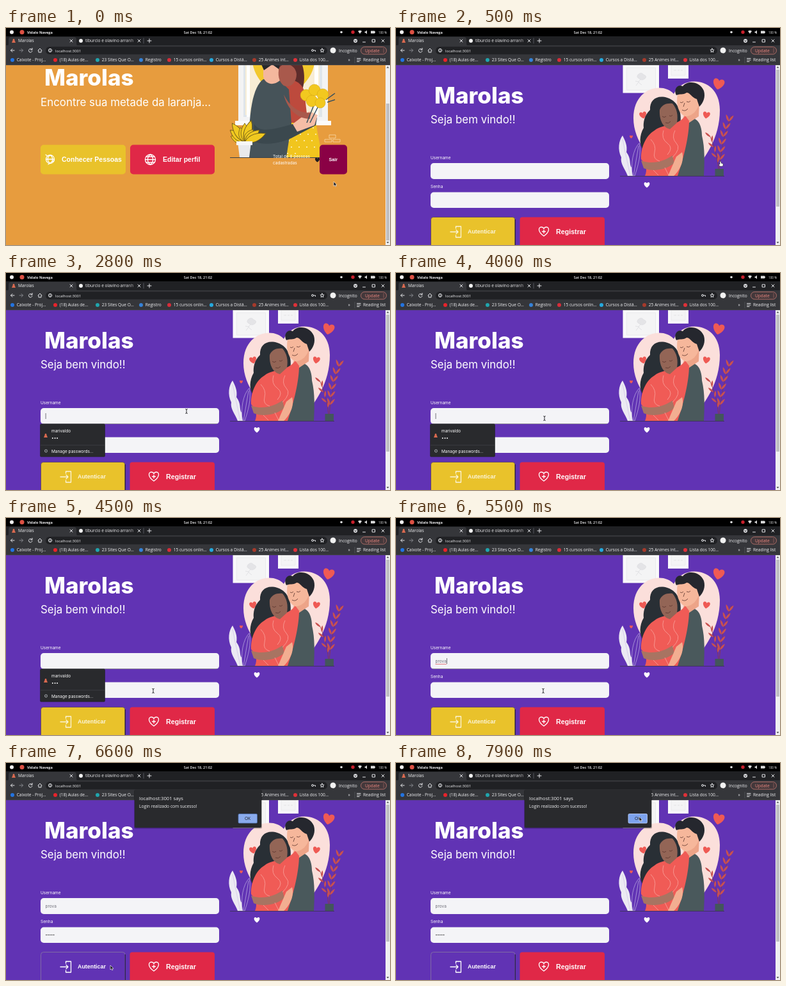
Recreate the animation shown at these times as an HTML page. Size 600 by 339 pixels, loop 8 s.

```html
<!DOCTYPE html>
<html lang="pt">
<head>
<meta charset="utf-8">
<title>Marolas</title>
<style>
html,body{margin:0;width:100%;height:100%;overflow:hidden;background:#6133b4}
svg{display:block;width:100%;height:100%}
text{font:6.6px "Open Sans","Noto Sans",sans-serif;fill:#f1f1f3;white-space:pre}
.page text{font-family:Inter,"Open Sans",sans-serif;font-size:6.5px;fill:#fff}
.page .logo{font-size:35px;font-weight:800}
.page .lead{font-size:16.9px}
.page .btn{font:bold 10.5px "Liberation Sans",Arial,sans-serif}
.page .typed{fill:#70707a}
.line{fill:none;stroke:#fff;stroke-width:1.3;stroke-linecap:round;stroke-linejoin:round}
.ui{fill:none;stroke:#e4e5e8;stroke-width:1;stroke-linecap:round}
</style>
</head>
<body>
<svg viewBox="0 0 600 339">
<defs>
  <path id="heart" d="M0 5.500C-7 1-6.500-5-3-5Q-.8-5 0-3Q.8-5 3-5C6.500-5 7 1 0 5.500Z"/>
  <path id="leaf" d="M0 0C-4-4-3-9 0-13C3-9 4-4 0 0Z"/>
  <path id="person" d="M-1-3h2l.6 2.500L3 3h-6l1.400-3.500Z" fill="#d9694f"/>
  <path id="cross" d="M-2-2L2 2M2-2L-2 2"/>
  <linearGradient id="fade"><stop stop-color="#202124" stop-opacity="0"/><stop offset="1" stop-color="#202124"/></linearGradient>
</defs>

<g id="home" class="page">
  <rect width="600" height="339" fill="#e79c3e"/>
  <text class="logo" x="60" y="90">Marolas</text>
  <text class="lead" x="54" y="122">Encontre sua metade da laranja...</text>
  <!-- window and couple -->
  <path d="M363 50H503V146H363Z" fill="#f3f3f4"/>
  <path d="M371 50H494V139H371Z" fill="#dfe5ea"/>
  <path d="M374 50H490V136H374Z" fill="#f8edd5"/>
  <path d="M385 50H482C482 82 450 100 434 116C416 100 386 82 385 50Z" fill="#f2c82c"/>
  <path d="M482 50H488V139H482ZM376 50H381V139H376Z" fill="#fff"/>
  <path d="M358 145H508V152H358Z" fill="#fbfbfb"/>
  <path d="M424 50H460C470 72 466 94 458 108L430 90Z" fill="#5d2c2b"/>
  <path d="M432 84C444 78 460 82 466 98L472 152H440Z" fill="#bd4a3d"/>
  <path d="M442 148H484L494 202H434Z" fill="#f1c51e"/>
  <g id="dots" fill="#fff6cf"></g>
  <path d="M402 80C386 92 378 130 380 202H438L446 150 442 96 428 82Z" fill="#465359"/>
  <path d="M388 150C396 165 420 158 448 150L486 140 484 152 446 172C420 184 394 182 386 176Z" fill="#3b484e"/>
  <path d="M448 150L474 130 487 136 482 152 455 162Z" fill="#f5bda6"/>
  <path d="M402 50H424L428 82C416 92 404 86 402 76Z" fill="#f4b79d"/>
  <path d="M427 62C434 52 452 56 454 72C454 86 444 94 434 90C426 84 424 72 427 62Z" fill="#a9594c"/>
  <path d="M396 50H430L426 64 416 57 403 66Z" fill="#25272c"/>
  <path d="M434 104C444 124 460 134 476 132L475 142C456 142 440 128 434 104Z" fill="#a9594c"/>
  <path d="M482 118L470 148M490 118L475 148M500 112L514 102M502 116L514 112" fill="none" stroke="#38505c" stroke-width="1.500"/>
  <g fill="#f2c81f" stroke="#d6a713" stroke-width=".6"><circle cx="469" cy="105" r="9"/><circle cx="482" cy="97" r="9"/><circle cx="495" cy="104" r="9"/><circle cx="478" cy="114" r="9"/><circle cx="491" cy="117" r="8"/></g>
  <g id="bush" fill="#f0c920" stroke="#6e5a18" stroke-width=".4"></g>
  <path d="M362 178H383L380 202H365Z" fill="#e9eaec"/><path d="M360 177H385V183H360Z" fill="#f7f7f8"/>
  <path d="M350 202.500H521" stroke="#37414a"/>
  <path d="M505 167h10v5h-10zM498 174h11v4h-11zM511 174h11v4h-11z" fill="none" stroke="#f8d9a9" stroke-width=".8"/>
  <rect x="54" y="182.500" width="133" height="46" rx="5" fill="#e9c22b"/>
  <rect x="194" y="182.500" width="132" height="46" rx="5" fill="#e02847"/>
  <rect x="490" y="182.500" width="43" height="46" rx="5" fill="#8a0145"/>
  <g class="line"><circle cx="69" cy="205" r="6.500"/><path d="M62.500 205H75.500M69 198.500C64 202 64 208 69 211.500C74 208 74 202 69 198.500M62 198l3 2M66 213l9-6"/>
  <circle cx="225.500" cy="205.500" r="8"/><path d="M217.500 205.500h16M219 201h13M219 210h13M225.500 197.500C220 202 220 209 225.500 213.500C231 209 231 202 225.500 197.500"/></g>
  <text class="btn" x="87" y="209">Conhecer Pessoas</text>
  <text class="btn" x="245" y="209">Editar perfil</text>
  <text class="btn" x="504.500" y="208" style="font-size:7.200px">Sair</text>
  <text x="417" y="203">Total de 8 pessoas</text><text x="417" y="212.500">cadastradas</text>
  <use href="#heart" transform="translate(486.500 206)scale(.65)" fill="#1e1a20"/>
</g>

<g id="login" class="page">
  <rect width="600" height="339" fill="#6133b4"/>
  <text class="logo" x="60" y="118">Marolas</text>
  <text class="lead" x="54" y="149.300">Seja bem vindo!!</text>
  <!-- pictures on the wall -->
  <path d="M354.500 58H411V101.500H354.500ZM425 50H457V79H425Z" fill="#f9f9fa"/>
  <path d="M360.500 62H405.500V97H360.500ZM430 56H452V74H430Z" fill="#f4f4f5" stroke="#e6e6e9" stroke-width=".7"/>
  <path d="M378 73q5-5 9 0q6 2 2 6q-5 4-9 0q-5-2-2-6ZM382 80l-7 10M380 84l-6-1M379 85l5 4M434 66h4M440 66h3M445 66h3" fill="#e4e4e7" stroke="#dddde1" stroke-width=".8"/>
  <!-- couple -->
  <path d="M434 103C418 84 371 92 371 141C371 178 400 208 426 231H460C484 202 506 172 506 128C506 76 448 72 434 103Z" fill="#fbdfdb"/>
  <g fill="#ef5a54"><use href="#heart" transform="translate(504 87.500)rotate(12)scale(1.600)"/><use href="#heart" transform="translate(386 136)rotate(-12)"/><use href="#heart" transform="translate(485 136)rotate(10)"/><use href="#heart" transform="translate(367.500 170)scale(.45)"/><use href="#heart" transform="translate(396 155)scale(.5)"/></g>
  <path d="M424 109C408 104 396 112 397 128C388 136 386 148 387 156C380 168 380 182 386 190C394 187 401 174 406 162L444 150C447 136 443 115 424 109Z" fill="#292f35"/>
  <path d="M456 144C468 136 478 148 478 168C483 188 482 212 481 231H430L446 196C452 178 456 160 456 144Z" fill="#4a595c"/>
  <path d="M453 128L474 113 473 138 455 150 445 150Z" fill="#eda488"/>
  <path d="M404 160C418 149 440 154 452 137L458 145C458 168 450 202 440 231H389C393 221 391 214 383 205C382 188 390 168 404 160Z" fill="#f05b56"/>
  <path d="M412 128C411 145 418 156 428 158L439 148C441 136 439 126 432 118C423 117 415 120 412 128Z" fill="#936556"/>
  <path d="M440 104C437 118 441 134 452 138C463 138 473 128 474 114L466 96H446Z" fill="#f6b79b"/>
  <path d="M438 105C433 96 440 87 448 91C456 81 475 84 481 98C484 108 480 117 474 123L470 111C462 109 460 101 454 101C448 105 444 102 438 105Z" fill="#25272e"/>
  <path d="M416 138q3 3 6 0M427 137q3 2 5-1M421 148q5 2 8-2M444 116q3 2 5-1M454 115q4 2 6-1M447 128q5 3 9-2M451 117l-2 6" fill="none" stroke="#5b342e" stroke-width=".8"/>
  <path d="M383 207C400 214 420 208 432 199L435 211C422 222 400 225 387 219Z" fill="#a87462"/>
  <path d="M438 201L447 194C451 206 444 222 434 231H425Z" fill="#f3ae91"/>
  <path d="M398 174q9 9 6 20t8 14M418 160q-4 13 6 20t0 18M436 160q-6 12 2 20t-6 22M402 222l8 8M420 218l6 12" fill="none" stroke="#f9a49e" stroke-width=".8"/>
  <!-- plants -->
  <path d="M362 231C358 220 350 212 352 202C346 190 348 176 354 168C358 176 362 184 360 194C368 204 364 212 368 218L370 231Z" fill="#eceaf3"/>
  <path d="M369 231C367 212 370 190 380 180C384 196 378 216 373 231ZM371 231L379 184" fill="none" stroke="#c3b3e2" stroke-width=".7"/>
  <path d="M366 231L354 174" stroke="#c9bce2" stroke-width=".6"/>
  <path d="M505 222C507 200 512 165 524 137M504 222C502 200 496 180 490 168" fill="none" stroke="#8c3742" stroke-width=".8"/>
  <g id="fern" fill="#c9514f"></g>
  <path d="M498.500 220H512V231H498.500Z" fill="#43565b"/>
  <path d="M350 231.500H513" stroke="#38324f" stroke-width=".8"/>
  <use href="#heart" transform="translate(392 245)scale(.8)" fill="#fff"/>
  <!-- form -->
  <text x="54" y="204.500">Username</text><text x="54" y="250">Senha</text>
  <rect x="54" y="211" width="279" height="25" rx="5" fill="#f4f4f7"/>
  <rect x="54" y="256.500" width="279" height="24.500" rx="5" fill="#f4f4f7"/>
  <path id="focus" d="M57 0H330" stroke="#77747f" stroke-width=".8"/>
  <text id="user" class="typed" x="61.500" y="226"></text>
  <path id="spell" stroke="#e0545a" stroke-width=".8"/>
  <g id="dotsIn" fill="#333"></g>
  <path id="caret" stroke="#55555c" stroke-width=".8"/>
  <rect id="enter" x="54.500" y="295.500" width="131.500" height="50" rx="4"/>
  <path d="M186.300 299V339" stroke="#251c42" stroke-width="1.200"/>
  <rect x="193.500" y="295.500" width="132.500" height="50" rx="4" fill="#e02847"/>
  <g id="enterLabel"><path class="line" d="M93.500 313V310H101.500V327H93.500V324M85 318.500H97M94 315.500L97 318.500 94 321.500" stroke-width="1.100"/>
  <text class="btn" x="112" y="321" style="font-size:8.900px">Autenticar</text></g>
  <path class="line" d="M231 325C221.500 318.500 222 311 227 311Q230 311 231 313.500Q232 311 235 311C240 311 240.500 318.500 231 325ZM231 315.500v5M228.500 318h5"/>
  <text class="btn" x="250" y="322" style="font-size:10.700px">Registrar</text>
  <g id="menu">
    <rect x="53.500" y="236" width="101" height="51" rx="1.500" fill="#292a2d" stroke="#1f2024" stroke-width=".6"/>
    <use href="#person" x="62" y="254"/>
    <text x="71" y="249">marivaldo</text><text x="71" y="260">•••</text>
    <path d="M54 269H154" stroke="#44464b" stroke-width=".7"/>
    <circle cx="62.500" cy="278" r="1.900" fill="none" stroke="#aaadb3" stroke-width="1.200" stroke-dasharray="1.200 .3"/>
    <text x="71" y="280.500">Manage passwords…</text>
  </g>
</g>

<!-- browser -->
<path d="M593 58H600V339H593Z" fill="#f0f0f1"/>
<rect id="thumb" x="594" width="5" height="214" fill="#bfbfc2"/>
<path d="M594.500 62.500L596.500 60 598.500 62.500ZM594.500 334L596.500 336.500 598.500 334Z" fill="#55565a"/>
<path d="M0 0H600V13H0Z"/>
<path d="M0 13H600V28H0Z" fill="#202124"/>
<path d="M0 27H600V58H0ZM1 28Q4 28 4 24V18Q4 14 8 14H106Q110 14 110 18V24Q110 28 114 28Z" fill="#35363a"/>
<path d="M0 57.700H600" stroke="#4a4b50" stroke-width=".6"/>
<circle cx="9" cy="6.500" r="3" fill="#f2f2f2"/><circle cx="25" cy="6.500" r="3.500" fill="#dd5144"/>
<text x="33" y="8.700" style="font-size:5.600px;font-weight:700">Vidalo Navega</text>
<text x="300" y="8.700" text-anchor="middle" style="font-size:5.500px;font-weight:600">Sat Dec 18, 21:02</text>
<circle cx="524" cy="6.500" r="1.800" fill="#ddd"/><circle cx="542" cy="6.500" r="2.700" fill="#c7202c"/>
<path d="M550 5Q553 2.500 556 5L553 9ZM560.500 5.500h1.500l2-2v6l-2-2h-1.500ZM570 4.500h6v1h1v2h-1v1h-6Z" fill="#ddd"/>
<text x="582" y="8.500" style="font-size:4.700px">100 %</text>
<use href="#person" x="12" y="20"/>
<text x="19" y="22.300">Marolas</text>
<circle cx="117" cy="20" r="3" fill="#f1f1f1"/>
<text x="124" y="22.300">tiburcio e olavino arranh</text>
<path d="M188 14H204V27H188ZM204 14H215V27H204Z" fill="url(#fade)"/>
<circle cx="546" cy="20" r="3" fill="#d6d7da"/><path d="M544.500 19.500L546 21 547.500 19.500" fill="none" stroke="#202124"/>
<g class="ui"><use href="#cross" x="102" y="20"/><use href="#cross" x="208" y="20"/><path d="M215 16V24" stroke="#55575c"/><path d="M221 20H227M224 17V23M557.500 22H561.500M572.500 18h4v4h-4Z"/><use href="#cross" x="589" y="20"/>
<path d="M13 35H7.500M10 32.500L7.500 35 10 37.500"/><path d="M21 35H26.500M24 32.500L26.500 35 24 37.500" stroke="#85878c"/><path d="M40.500 33.500A2.800 2.800 0 1 0 41 36M41 31.500V34H38.500M50 35L53 32 56 35M51 35V38H55V35"/></g>
<rect x="62" y="29.300" width="440" height="12" rx="6" fill="#202124"/>
<g class="ui" stroke-width=".8"><circle cx="69" cy="35" r="2.600"/><path d="M69 34.800V36.500M69 33.400V33.500M494 32l.9 2 2.200.2-1.700 1.500.5 2.200-1.900-1.200-1.900 1.200.5-2.200-1.700-1.500 2.200-.2Z"/><path id="key" d="M480.500 35a1.500 1.500 0 1 0-3 0a1.500 1.500 0 1 0 3 0H483.500V36.500"/></g>
<text x="77" y="37.500" style="font-size:6px">localhost:3001</text>
<circle cx="511" cy="35" r="4.500" fill="#f1f1f1"/><text x="520" y="37.500">Incognito</text>
<rect x="554.500" y="29.500" width="40" height="11.500" rx="5.700" fill="#43383b" stroke="#d98279" stroke-width=".7"/>
<text x="561" y="37.500" style="fill:#f28b82">Update</text>
<path d="M590 32.800v.1M590 35.200v.1M590 37.600v.1" class="ui" style="stroke:#f28b82"/>
<g id="marks"></g>
<text x="534.500" y="52.300">»</text><path d="M545 45V55" stroke="#5b5d62" stroke-width=".7"/>
<path class="ui" d="M548.500 47.500H554M548.500 50H554M548.500 52.500H552"/><text x="558" y="52.300">Reading list</text>

<g id="alert">
  <rect x="200" y="42" width="200" height="60.500" rx="2" fill="#000" opacity=".3"/>
  <rect x="201" y="41.500" width="198" height="59.500" rx="2" fill="#292a2d"/>
  <text x="208" y="57.500" style="font-size:7.650px">localhost:3001 says</text>
  <text x="208" y="70" style="font-size:6.700px">Login realizado com sucesso!</text>
  <rect id="ok" x="363" y="79.500" width="29.500" height="14.500" rx="1.500" stroke-width=".8"/>
  <text x="377.500" y="89" text-anchor="middle" style="fill:#202124">OK</text>
</g>

<g id="mouse">
  <path id="arrow" d="M0 0V7L1.600 5.500 2.700 7.900 3.900 7.300 2.800 5.100H5Z" fill="#18181b" stroke="#fff" stroke-width=".6"/>
  <path id="hand" d="M-1-2Q0-3.500 1-2V0L4 1V4L3 5H-1L-3 2-1 2Z" fill="#fff" stroke="#222" stroke-width=".5"/>
  <path id="beam" d="M-1.700-3.500Q0-3.500 0-2Q0-3.500 1.700-3.500M0-2V2M-1.700 3.500Q0 3.500 0 2Q0 3.500 1.700 3.500" fill="none" stroke="#18181b" stroke-width=".9"/>
</g>
</svg>

<script>
const $ = id => document.getElementById(id);
const show = (id, on) => $(id).style.display = on ? '' : 'none';
const set = (id, name, value) => $(id).setAttribute(name, value);
const clamp = (v, lo, hi) => Math.max(lo, Math.min(hi, v));
const fill = (id, list, draw) => $(id).innerHTML = list.map(draw).join('');
const range = n => [...Array(n).keys()];

fill('marks', [
  [10, '#2374e1', 'Caixote - Proj...'], [77, '#e8232b', '(18) Aulas de...'],
  [143, '#20a5ae', '23 Sites Que O...'], [211, '#3582d8', 'Registro'],
  [255, '#d82d3a', '15 cursos onlin...'], [321, '#25a9dd', 'Cursos a Distâ...'],
  [388, '#a63a2b', '25 Animes int...'], [452, '#df3038', 'Lista dos 100...']
], ([x, color, label]) => `<circle cx="${x}" cy="50" r="3" fill="${color}"/><text x="${x + 6.7}" y="52.300">${label}</text>`);

const leaf = (x, y, turn, w, h) =>
  `<use href="#leaf" transform="translate(${x} ${y})rotate(${turn})scale(${w} ${h})"/>`;
fill('fern', range(6), i => {
  const x = 506 + i * i * .55, y = 206 - i * 12, lx = 503 - i * 2.4, ly = 210 - i * 8;
  return leaf(x, y, 40, .6, .95) + leaf(x, y, -20, .6, .9) + leaf(lx, ly, i % 2 ? -50 : 5, .55, .8);
});
fill('bush', range(9), i => leaf(373, 178, -68 + i * 17, 2.2, 1.8 + i % 3 * .45));
fill('dots', range(18), i =>
  `<circle cx="${444 + i % 4 * 12 + (i >> 2) % 2 * 5 - (i >> 2)}" cy="${156 + (i >> 2) * 10}" r="1"/>`);

// time, x, y
const path = [
  [0, 512, 240], [300, 507, 211], [900, 507, 211], [1500, 282, 216], [3900, 282, 216],
  [4000, 232, 227], [4500, 230, 270], [6200, 230, 270], [6500, 163, 316],
  [7000, 163, 316], [7900, 380, 84], [8000, 380, 84]
];
function mouseAt(t) {
  const i = path.findIndex((p, k) => t < path[k + 1][0]);
  const [t0, x0, y0] = path[i], [t1, x1, y1] = path[i + 1];
  const u = (t - t0) / (t1 - t0), e = u * u * (3 - 2 * u);
  return [x0 + (x1 - x0) * e, y0 + (y1 - y0) * e];
}

function draw(t) {
  const login = t >= 300, [x, y] = mouseAt(t);
  const letters = clamp((t - 5000) / 100, 0, 5), secret = clamp((t - 5800) / 100, 0, 5);
  const onUser = t >= 1500 && t < 5700, onSecret = t >= 5700 && t < 6500;
  const hover = t >= 6500, fresh = login && t < 1000;

  show('home', !login);
  show('login', login);
  set('thumb', 'y', login ? 65 : 118);
  show('key', !fresh);
  show('menu', t >= 1500 && !letters);
  show('alert', t >= 6600);

  $('user').textContent = 'prova'.slice(0, letters);
  const end = 61.5 + (letters ? $('user').getComputedTextLength() : 0);
  show('spell', onUser && letters);
  set('spell', 'd', `M61.500 228.300H${end}`);
  fill('dotsIn', range(secret), i => `<circle cx="${63 + i * 2.9}" cy="268.500" r=".85"/>`);
  show('focus', onUser || onSecret);
  set('focus', 'transform', `translate(0 ${onUser ? 235.6 : 280.6})`);
  const blink = letters > 0 || Math.floor((t - 1600) / 580) % 2 === 0;
  show('caret', onSecret || onUser && blink);
  set('caret', 'd', onUser ? `M${end + .6} 219V228` : `M${62 + secret * 3} 264.500V273`);

  set('enter', 'fill', hover ? '#6133b4' : '#e9c22b');
  set('enter', 'stroke', hover ? '#8d819f' : '#4a3560');
  set('enter', 'stroke-width', .7);
  set('enterLabel', 'opacity', hover ? 1 : .82);
  const pressing = t >= 7700;
  set('ok', 'fill', pressing ? '#7da3ee' : '#8aabed');
  set('ok', 'stroke', pressing ? '#c3d5fa' : '#4c6ca9');

  const inField = login && x > 54 && x < 333 && (y > 211 && y < 236 || y > 256 && y < 281);
  show('beam', inField);
  show('hand', fresh);
  show('arrow', !inField && !fresh);
  set('mouse', 'transform', `translate(${x} ${y})`);
}

function tick(now) {
  draw(Math.floor(now % 8000 / 100) * 100);
  requestAnimationFrame(tick);
}
draw(0);
requestAnimationFrame(tick);
</script>
</body>
</html>
```
